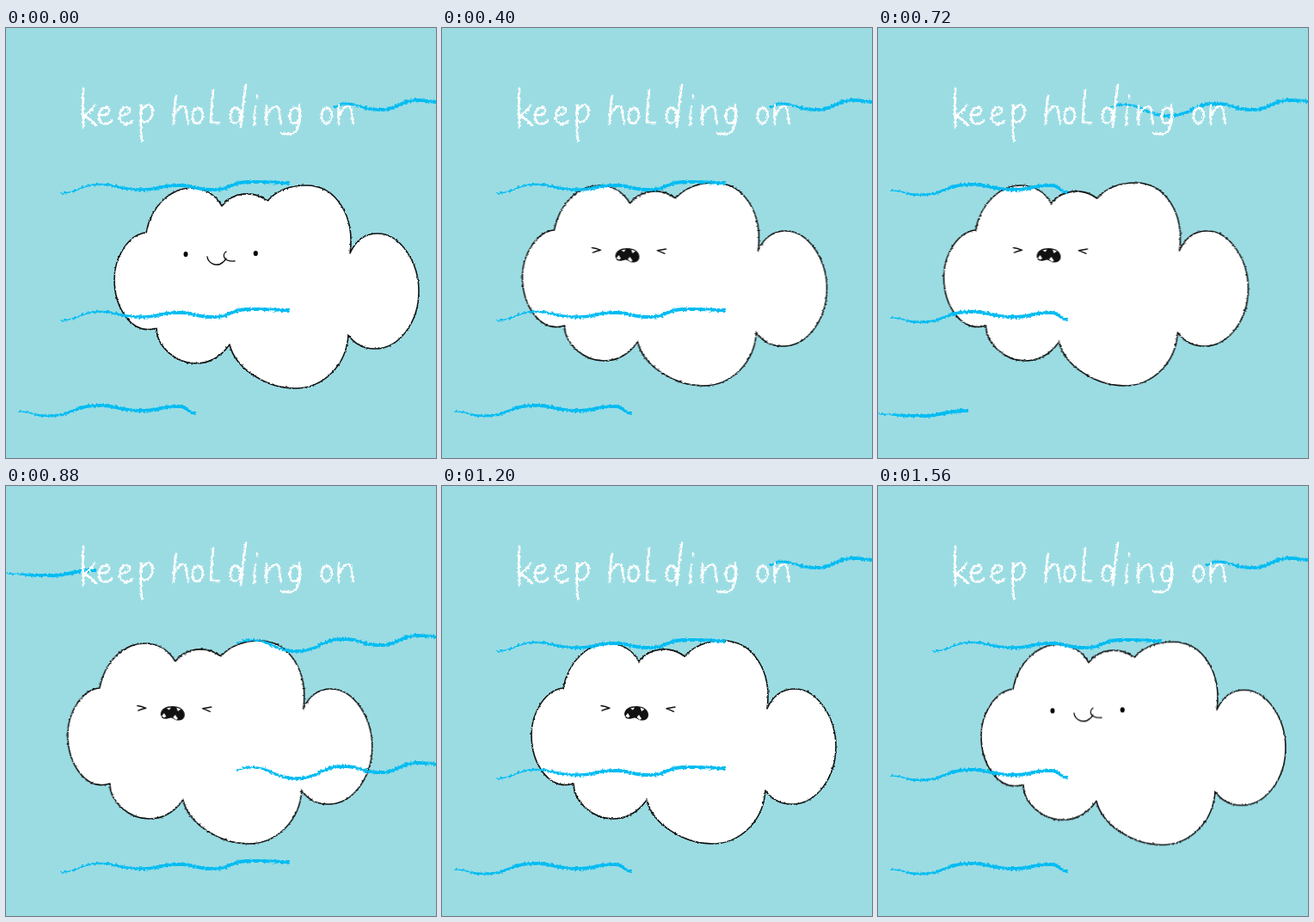
Recreate the animation shown at these times as an HTML page. Size 500 by 500 pixels, loop 1600 ms.

```html
<!DOCTYPE html>
<html lang="en">
<head>
<meta charset="utf-8">
<title>keep holding on</title>
<style>
  html, body { margin: 0; width: 100%; height: 100%; overflow: hidden; background: #9bdce3; }
  svg { display: block; width: 100%; height: 100%; }
  path { stroke-linecap: round; stroke-linejoin: round; }
  .outline { fill: #fff; stroke: #111; stroke-width: 1.6; }
  .line { fill: none; stroke: #111; stroke-width: 1.4; }
  .gust { fill: #00bcf2; filter: url(#chalk); }
  #words { fill: none; stroke: #fff; stroke-width: 2.6; filter: url(#chalk); }
</style>
</head>
<body>
<svg viewBox="0 0 500 500" role="img" aria-label="keep holding on">
  <defs id="filters"></defs>
  <defs>
    <path id="puff" d="M153 346
      C124 355 104 322 104 289 C104 264 120 237 141 235
      C147 203 170 183 194 183 C210 183 222 192 229 204
      C241 188 265 185 282 198
      C292 187 308 180 327 180 C362 180 384 216 378 259
      C385 243 396 236 410 236 C437 236 458 270 458 303
      C458 338 436 370 407 370 C394 370 383 364 376 354
      C374 388 348 416 314 416 C282 416 245 394 238 365
      C228 379 214 387 199 387 C175 387 153 367 153 346Z"/>
  </defs>

  <g id="cloud">
    <g id="outlines"></g>
    <g id="smile">
      <ellipse cx="187" cy="260" rx="2.5" ry="3.1"/>
      <ellipse cx="268.3" cy="259" rx="2.6" ry="3.1"/>
      <path class="line" d="M212 263C213 270 221 274 227 271.500C231 269.500 233 267 234 265M234 257C229.500 260 229.500 269 244 268"/>
    </g>
    <g id="cry">
      <path class="line" d="M185 255.500Q190 256 195 258.300Q190 259.500 186 261.200M271 257L261 258.800Q265 260 269.500 262.300"/>
      <path fill="#111" d="M212 266C212 259 218 256 226 256C234 256 240 260 240 266C240 271 236 273 231 272.500C228 272 226 269 223.500 269.500C221 270.500 217 271.500 214 270Z"/>
      <path fill="#fff" d="M219 258.500L224 257.500L222 260.500ZM230.500 257.500L235.500 259.500L232 262ZM213.500 267.500L216 264L218.500 268L216 269.500ZM226.500 269L229 266L232 270.500L230 272Z"/>
    </g>
  </g>

  <g id="wind"></g>
  <g id="words"></g>
</svg>

<script>
const $ = id => document.getElementById(id);
const LOOP = 1600, DRAWINGS = 10, TICK = 40;

// Rough edges; opaque noise keeps the displacement centred
const rough = (id, seed, scale) => `
  <filter id="${id}" filterUnits="userSpaceOnUse" x="0" y="0" width="500" height="500" color-interpolation-filters="sRGB">
    <feTurbulence type="fractalNoise" baseFrequency=".4" numOctaves="2" seed="${seed}"/>
    <feColorMatrix values="1 0 0 0 0  0 1 0 0 0  0 0 1 0 0  0 0 0 0 1"/>
    <feDisplacementMap in="SourceGraphic" scale="${scale}" xChannelSelector="R" yChannelSelector="G"/>
  </filter>`;
$('filters').innerHTML = rough('chalk', 9, 4) + [0, 1, 2].map(i => rough('ink' + i, i + 3, 2.6)).join('');

// Endless loop of n equal holds
const hold = (el, n, duration, pose) => el.animate(
  Array.from({ length: n + 1 }, (_, i) => ({ ...pose(i % n), offset: i / n, easing: 'step-end' })),
  { duration, iterations: Infinity }
);
const show = on => ({ visibility: on ? 'visible' : 'hidden' });

// Three redrawn outlines take turns
$('outlines').innerHTML = [0, 1, 2].map(i =>
  `<use href="#puff" class="outline" filter="url(#ink${i})"/>`).join('');
[...$('outlines').children].forEach((el, i) => hold(el, DRAWINGS, LOOP, g => show(g % 3 === i)));

// Pushed left with easing, then drifting back and down to rest
const drift = g => {
  if (g > 0 && g < 7) return [-34 * Math.sin((g - 1) / 5 * Math.PI / 2), 0];
  const u = (g || DRAWINGS) / 3 - 7 / 3;
  return [22 * u ** 0.8, 3 * u * u];
};
hold($('cloud'), DRAWINGS, LOOP, g => {
  const [x, y] = drift(g);
  return { transform: `translate(${x.toFixed(1)}px, ${y.toFixed(1)}px)` };
});
const crying = g => g > 0 && g < 8;
hold($('cry'), DRAWINGS, LOOP, g => show(crying(g)));
hold($('smile'), DRAWINGS, LOOP, g => show(!crying(g)));

// Troughs and crests of the wave that every gust follows
const wave = [[48, 194], [108, 182], [157, 188], [201, 183], [240, 188],
  [283, 179], [338, 192], [392, 178], [435, 185], [479, 174]];
// Ends of the visible piece, as the gust travels right
const pieces = [
  [[-4, 192], [105, 188]],
  [[14, 189], [221, 191]],
  [[63, 192], [330, 180]],
  [[268, 182], [504, 175]],
  [[380, 182], [504, 176]]
];
const flow = pts => pts.slice(1).map(([x, y], i) => {
  const mid = (x + pts[i][0]) / 2;
  return `C${mid} ${pts[i][1]} ${mid} ${y} ${x} ${y}`;
}).join('');
const ribbon = ([from, to]) => {
  const pts = [from, ...wave.filter(([x]) => x > from[0] + 8 && x < to[0] - 8), to];
  const edge = side => pts.map(([x, y], i) =>
    [x, y + side * (0.8 + 1.2 * Math.min(1, 2.5 * i / (pts.length - 1)))]);
  const top = edge(-1), low = edge(1).reverse();
  return `M${top[0]}${flow(top)}L${low[0]}${flow(low)}Z`;
};

// Each row: vertical shift and starting tick; a piece lasts two ticks
for (const [dy, start] of [[-90, 1], [0, 5], [148, 6], [257, 7]]) {
  pieces.forEach((piece, i) => {
    $('wind').insertAdjacentHTML('beforeend',
      `<path class="gust" transform="translate(0 ${dy})" d="${ribbon(piece)}"/>`);
    const first = (start + 2 * i) % 10;
    hold($('wind').lastChild, 10, 10 * TICK, t => show((t - first + 10) % 10 < 2));
  });
}

// Handwriting: shared strokes, then letters with their left edges
const arch = 'M0 103C5 90 14 87 15 97Q15 105 17 111';
const bowl = 'M7 93C-2 91 -2 111 5 111C13 111 14 94 7 93';
const letters = [
  ['M0 70Q-1 94 0 116M13 90Q7 99 1 102Q9 107 15 113', 90],
  ['M0 102Q13 101 12 95C10 89 0 93 0 103C1 114 10 113 15 108', 108, 132],
  ['M0 90Q-1 112 1 132M0 97C6 85 16 89 13 100C11 109 5 111 1 108', 157],
  ['M3 78Q0 96 0 112' + arch, 195],
  [bowl, 217, 367],
  ['M3 72Q1 92 0 109Q5 111 10 110', 238],
  [bowl + 'M18 66Q14 92 12 116', 261],
  ['M1 91Q-1 102 0 113M3 79V80.500', 289],
  ['M0 90Q-1 102 0 112' + arch, 303, 387],
  [bowl + 'M11 90Q14 107 8 119Q2 126 -10 122', 330]
];
$('words').innerHTML = letters.map(([d, ...xs]) =>
  xs.map(x => `<path transform="translate(${x} 0)" d="${d}"/>`).join('')).join('');
</script>
</body>
</html>
```
